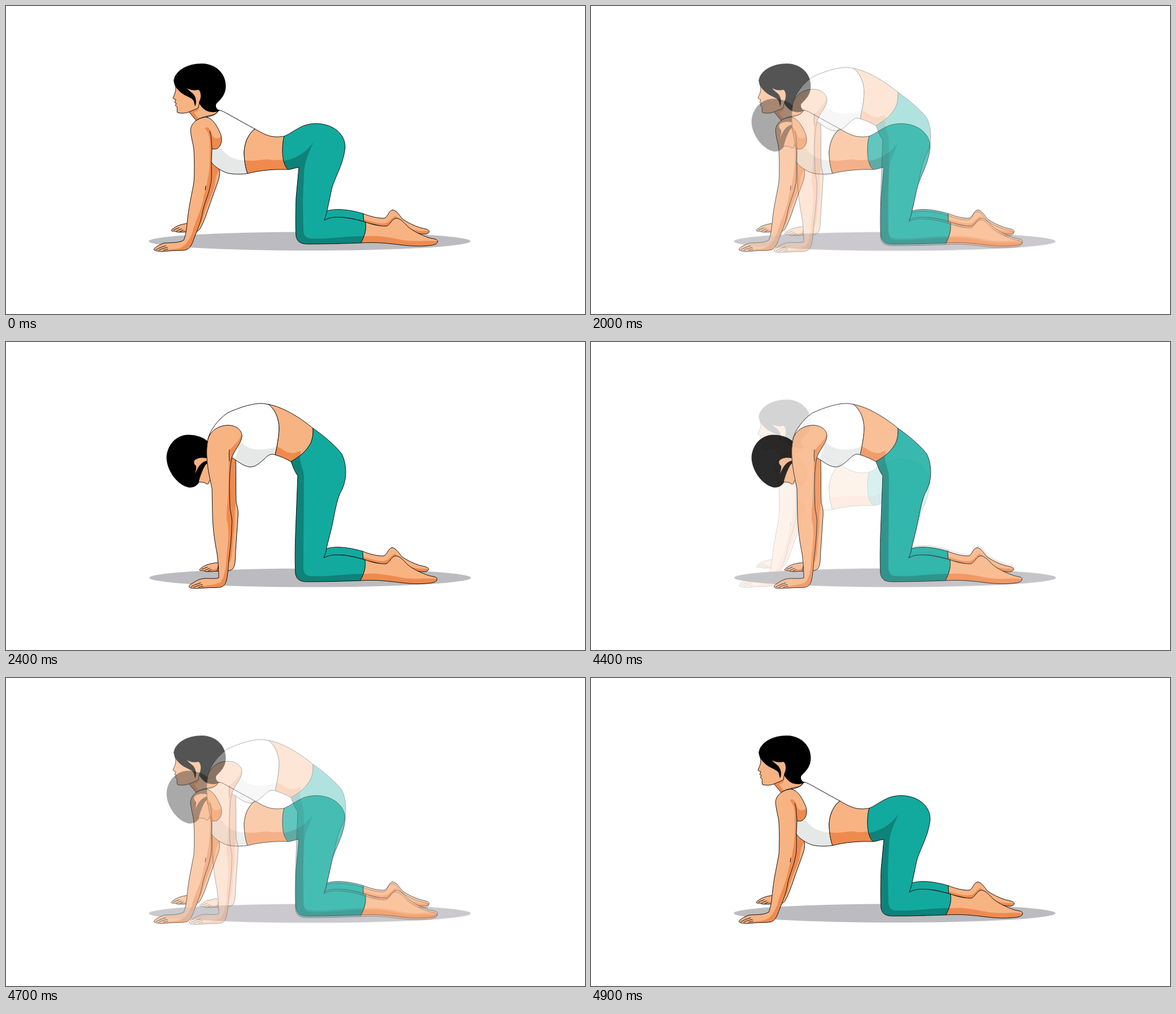
These frames come from a looping animation (1026x546 px, 5 s). An HTML page:

```html
<!DOCTYPE html>
<html lang="en">
<head>
<meta charset="utf-8">
<title>Cat and cow stretch</title>
<style>
html, body { margin: 0; width: 100%; height: 100%; overflow: hidden; background: #fff; }
svg { position: absolute; left: 0; top: 0; width: 1026px; height: 546px; }
.line { fill: none; stroke: #111; stroke-width: 1; stroke-linejoin: round; stroke-linecap: round; }
</style>
</head>
<body>
<script>
const SKIN = '#f8b383', SKIN_DARK = '#ef8a4e';
const TEAL = '#12aa9e', TEAL_DARK = '#0f8279';
const WHITE = '#fff', GREY = '#e6e8e8', BLACK = '#000';

let clips = 0;
const fill = (d, color) => `<path d="${d}" fill="${color}"/>`;
const line = d => `<path class="line" d="${d}"/>`;
const move = (x, y, body) => `<g transform="translate(${x} ${y})">${body}</g>`;

// Filled shape with a shade clipped to it and an outline on top.
function part(d, color, shade, shadeColor) {
  const id = 'clip' + clips++;
  const inner = shade
    ? `<clipPath id="${id}"><path d="${d}"/></clipPath><g clip-path="url(#${id})">${fill(shade, shadeColor)}</g>`
    : '';
  return fill(d, color) + inner + line(d);
}
const skin = (d, shade) => part(d, SKIN, shade, SKIN_DARK);
const teal = (d, shade) => part(d, TEAL, shade, TEAL_DARK);
const white = (d, shade) => part(d, WHITE, shade, GREY);

const floor = '<ellipse cx="538" cy="417" rx="285" ry="16.5" fill="#bcbbbf"/>';

// Lower leg outline and shade, relative to the knee crease.
const shin = 'c6-4 14-6 26-5.5c15 0 30 4 47 8.5c2 10 0 22-8 37c-29 1-59 2-94 2c-13 0-19-4-21-14';
const shinShade = 'c0 12 4 17 14 17c30 2 60-5 95-4v20h-130z';

const farLeg = () =>
  skin('M633 368C645 373 660 377 671 376C677 373 678 363 685 361.5C692 362 697 371 703 378C712 384 722 389 734 393C743 395 750 396 750 400C749 404 744 405 736 404L690 396L634 383Z',
    'M633 378C648 382 660 387 672 385C680 383 683 376 690 372C696 378 700 388 712 393C725 399 738 399 751 399V408H633Z') +
  teal('M567 364C580 359 602 359 633 368L634 382C620 378 604 374 588 374.5C577 375 569 377 564 380Z');

const nearFoot = () =>
  skin('M637 383C650 388 665 391 675 390C682 386 684 377 692 376C700 377 706 385 713 392C723 400 736 406 750 411C758 413 764 413 765 417C764 423 758 424 745 425C735 426 720 426 700 423.5C680 421 655 418 629 420C637 405 639 393 637 383Z',
    'M629 409C660 404 685 412 710 416C730 418 745 415 766 417V430H625Z');

const fingers = line('M266 432C271 429 276 427 283 425M271 433C276 430 281 429 286 428M279 433L287 431');
const farFingers = line('M297 397L307 393M302 399L311 395M308 400L314 397');

const farHand = () =>
  skin('M326 385C313 386 303 389 297 394C290 398 293 400 299 399C303 402 311 401 328 400Z',
    'M304 401C312 397 320 398 330 393V404H304Z') + farFingers;

function cowPose() {
  return floor + farLeg() + farHand() +
    skin('M358 268L378 290C379 298 378 303 377 307C372 322 365 340 360 355C355 370 349 387 343 396C340 401 330 401 320 401L323 380Z',
      'M355 268L380 290C373 294 371 306 370 318C365 335 356 352 350 372C346 388 340 392 332 394L340 372L358 310Z') +
    skin('M323 186L337 203C345 197 354 196 362 194C370 193 374 189 376 185L343 160Z',
      'M322 185L342 178C343 184 338 188 333 188C336 193 339 197 342 200L337 205Z') +
    white('M377 184.5C383 185 388 189 394 192L441 218C430 226 423 241 422 258C422 272 424 286 428 297C413 299 400 298 392 296C380 292 369 284 364 277L350 215L355 197C369 194 373 192 377 184.5Z',
      'M360 253L382 253C391 267 405 273 425 274L432 300H360Z') +
    skin('M441 218C455 226 465 232 480 232C487 232 490 231 493 231C489 247 488 275 500 290C478 289 450 291 428 297C424 286 422 272 422 258C423 241 430 226 441 218Z',
      'M422 273C440 277 450 271 465 272C478 275 484 272 505 271V300H422Z') +
    teal('M493 231C505 226 515 217 528 212C545 206 565 208 578 215C592 222 601 235 601 250C600 262 596 277 590 291C585 303 579 316 577 325L569 363C567 372 565 376 564 380' + shin +
      'C513 396 513 370 514 340L519 286C511 287 505 290 500 290C493 285 490 270 490 258C490 245 491 236 493 231Z',
      'M485 276C512 272 530 262 545 241C536 262 529 275 528 297L526 345L527 395' + shinShade + 'L485 410Z') +
    nearFoot() +
    fill('M298 128C303 114 321 102 347 102C372 102 389.500 120 389.500 142C389 158 381 165 373 173C370 178 374 184 379 185C371 190 358 189 351 183C345 178 342 172 341 169L320 150L299 141Z', BLACK) +
    skin('M300 141C303 150 298 157 296 163C296 165 299 165 301 166L299 171L302 173L300 176L303 179C304 183 302 186 304 189C312 191 320 190 326 187C333 184 339 182 341 180L343 169C347 162 346 151 341 148C334 150 326 149 319 144Z') +
    fill('M297 130C297 140 304 150 315 157C324 162 332 164 333 170L335 178C339 170 336 160 331 155C326 151 323 149 319 143L310 130Z', BLACK) +
    skin('M355 197C366 199 373 211 378 222C383 231 383 240 380 246C377 253 371 255 365 253L364 275C364 290 365 310 362 318C360 331 353 346 349 362C346 382 340 395 334 410C330 422 326 431 318 432.500C310 434 298 433 285 434.500C275 436 266 435 262 432C263 428 271 424 279 420.500C290 419 305 421 315 415C319 405 320 395 322 375C325 350 330 330 333 312C334 295 334 275 333 258C333 248 328 235 327 220C328 207 340 198 355 197Z',
      'M352 217C358 211 363 219 366 230C370 237 376 235 384 230V256L366 256V322L330 436H275L294 431C312 431 321 424 330 402C334 384 344 368 349 345C351 330 356 322 357 308C361 294 362 270 361 248C362 235 359 223 352 217Z') +
    line('M365 253L363.500 234C363 228 362 225 361 222M354 319L353 326') +
    fingers;
}

function catPose() {
  return move(1, 1, floor) + move(-1, 3, farLeg()) + move(50, 6, farHand()) +
    skin('M396 204L407 207C408 235 407 260 408 285C411 295 412 302 411 310C410 330 408 350 407 370C406 385 407 395 402 402C396 407 386 407 374 406L378 390L392 300Z',
      'M395 203L407 207C406 235 408 262 407 290C404 302 406 318 404 335C401 358 402 378 397 390L380 400L390 320Z') +
    fill('M358 176C348 168 335 164 322 164.500C300 165 284 185 284.500 207C286 230 305 255 325 258C335 258 340 253 343 247L358 215Z', BLACK) +
    skin('M358 211C350 220 345 234 341 248C347 249 352 248 354 251C357 253 360 251 360 248C359 245 362 246 366 246L365 211Z') +
    fill('M333 212C336 206 345 204 356 206L357 210C347 212 341 219 335 234C337 225 339 219 334 217Z', SKIN) +
    fill('M358 210C347 213 341 224 333 238L338 251L342 248C341 236 347 221 358 214Z', BLACK) +
    white('M358 171C362 156 375 138 392 126C415 115 440 108 455 109L465 110.500C480 122 484 140 484 155C483 172 480 186 477 200C470 197 465 200 458 207C450 214 442 222 432 221.500C420 220 412 212 402 206L357 200Z',
      'M416 177C430 194 458 194 484 184V224H400Z') +
    skin('M465 110.500C490 115 520 133 544 153C545 165 542 178 537 184C530 196 517 205 505 212C496 207 487 203 477 200C480 186 483 172 484 155C484 140 480 122 465 110.500Z',
      'M478 185C489 187 493 195 502 196C510 199 516 194 522 193V215H475Z') +
    teal('M544 153C560 164 580 180 594 197C600 207 602 220 602 232C602 245 598 258 592 268C586 282 583 300 579 320C575 340 568 362 567 372L563 383' + shin +
      'C512 396 512 370 513 340L517 237C511 229 508 219 505 212C517 205 530 196 537 184C542 178 545 165 544 153Z',
      'M500 212L521 200C520 216 528 226 528 240L527 398' + shinShade + 'L500 415Z') +
    move(-1, 3, nearFoot()) +
    skin('M357 178C358 162 372 148 394 147.500C410 148 419 158 418 168C415 184 404 191 400 206C397 218 396 240 396 260L397 295C400 310 401 318 400 325C400 345 397 370 395 385C394 400 393 415 390 425C386 436 378 435 370 435.500C355 435 340 438 327 436C322 434 325 430 330 428C337 423 343 420 352 419C362 419 372 420 377 418C377 405 376 390 374 375C370 355 367 335 366 310L365 260C362 245 357 225 356 205C355 195 356 185 357 178Z',
      'M419 158C414 178 402 183 396 193C394 215 395 240 394 262C393 285 390 302 391 315C396 330 394 355 391 378C390 400 388 416 380 426C370 431 360 430 347 434V440H395L405 320L402 206L420 185Z') +
    line('M396 211C395 203 395 198 396 191') +
    move(62, 2, fingers);
}

const stage = body => `<svg viewBox="0 0 1026 546">${body}</svg>`;
document.body.innerHTML = stage(cowPose()) + stage(catPose());

// Both poses fade at once over white, in five 100 ms blends per dissolve.
const blend = 'steps(5, jump-both)';
function fade(pose, from, to) {
  pose.animate([
    { offset: 0, opacity: from },
    { offset: 0.38, opacity: from, easing: blend },
    { offset: 0.48, opacity: to },
    { offset: 0.88, opacity: to, easing: blend },
    { offset: 0.98, opacity: from },
    { offset: 1, opacity: from }
  ], { duration: 5000, iterations: Infinity });
}
const [cow, cat] = document.body.children;
fade(cow, 1, 0);
fade(cat, 0, 1);
</script>
</body>
</html>
```
